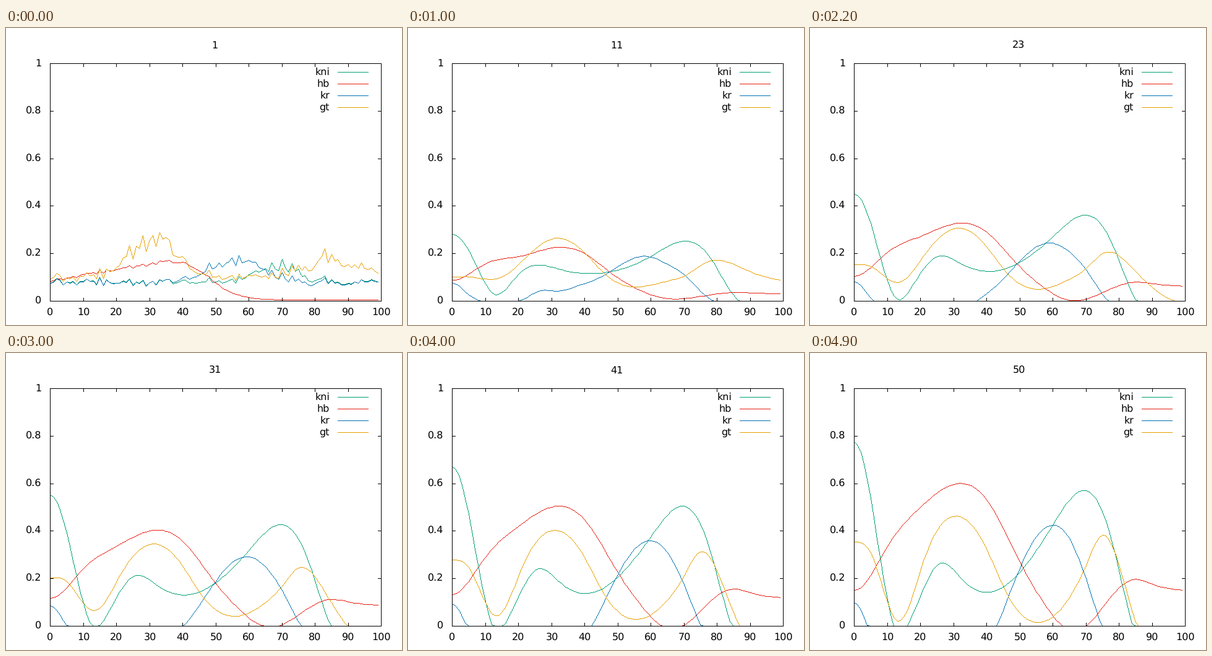
Animation, 640 px wide and 480 px high, one loop 5 s. Source, as a matplotlib script:

```python
import matplotlib.pyplot as plt
import numpy as np
from matplotlib.animation import FuncAnimation
from matplotlib.colors import to_rgb

W, H, DPI = 640, 480, 100
FRAMES, INTERVAL = 50, 100
LEFT, RIGHT, TOP, BOTTOM = 71, 606, 57, 441
RELAX_END = 7
CELLS = np.arange(100)

plt.rcParams["text.hinting"] = "none"
FONT = dict(family="DejaVu Sans", size=16 * 72 / DPI, color="black")


def bump(center, width):
    return np.exp(-((CELLS - center) / width) ** 2 / 2)


# name: colour, growth exponent, noisy start, key points (cell, early, late).
# Levels below zero are clipped when drawn.
GENES = {
    "kni": ("#009e73", 0.85, 0.082 + 0.065 * bump(69, 6), [
        (0, 0.205, 0.775), (5, 0.165, 0.54), (13, 0.036, -0.03), (16, 0.055, 0),
        (20, 0.11, 0.125), (26, 0.135, 0.265), (32, 0.125, 0.205), (41, 0.112, 0.143),
        (60, 0.152, 0.425), (71, 0.204, 0.565), (77, 0.17, 0.4), (84, 0.05, 0.01),
        (99, -0.05, -0.2)]),
    "hb": ("#e51e10", 1.16, (0.08 + 0.0025 * CELLS) / (1 + np.exp((CELLS - 47.5) / 4)) + 0.005, [
        (0, 0.083, 0.15), (10, 0.145, 0.335), (20, 0.166, 0.5), (33, 0.202, 0.6),
        (40, 0.178, 0.532), (50, 0.086, 0.271), (57, 0.04, 0.103), (63, 0.016, 0),
        (69, 0.011, -0.01), (76, 0.017, 0.096), (84, 0.025, 0.195), (91, 0.025, 0.172),
        (99, 0.022, 0.152)]),
    "kr": ("#0072b2", 1.3, 0.08 + 0.09 * bump(56, 8), [
        (0, 0.075, 0.1), (5, 0.03, -0.03), (14, -0.002, -0.12), (20, 0.008, -0.2),
        (27, 0.06, -0.28), (32, 0.057, -0.27), (38, 0.075, -0.16), (45, 0.104, 0.064),
        (52, 0.155, 0.305), (59, 0.177, 0.423), (65, 0.145, 0.37), (70, 0.107, 0.2),
        (75, 0.045, -0.01), (99, -0.05, -0.2)]),
    "gt": ("#e69f00", 1.45, 0.1 + 0.17 * bump(31, 7) + 0.08 * bump(85, 8), [
        (0, 0.092, 0.353), (5, 0.096, 0.31), (13, 0.096, 0.022), (17, 0.119, 0.1),
        (21, 0.162, 0.275), (30, 0.255, 0.462), (40, 0.2, 0.325), (46, 0.115, 0.14),
        (54, 0.062, 0.018), (65, 0.083, 0.12), (70, 0.1, 0.255), (75, 0.142, 0.383),
        (79, 0.168, 0.3), (83, 0.167, 0.113), (92, 0.125, -0.25), (99, 0.105, -0.38)]),
}


def spline(x, y):
    """Natural cubic spline over the cells, level at cell 0 by mirroring."""
    x = np.r_[-x[:0:-1], x] / 100
    y = np.r_[y[:0:-1], y]
    side = np.c_[np.ones_like(x), x]
    cubes = abs(x[:, None] - x) ** 3
    weights = np.linalg.solve(np.block([[cubes, side], [side.T, np.zeros((2, 2))]]),
                              np.r_[y, 0, 0])
    at = CELLS / 100
    return np.c_[abs(at[:, None] - x) ** 3, np.ones_like(at), at] @ weights


def diffuse(y, sigma):
    kernel = np.exp(-((CELLS[:, None] - CELLS) / sigma) ** 2 / 2)
    return kernel @ y / kernel.sum(axis=1)


class Gene:
    def __init__(self, color, power, start, points, noise):
        self.color, self.power = to_rgb(color), power
        x, early, late = np.array(points, float).T
        self.early, self.late = spline(x, early), spline(x, late)
        self.rough = start * (1 + noise)

    def levels(self, step):
        if step >= RELAX_END:
            grown = ((step - RELAX_END) / (FRAMES - RELAX_END)) ** self.power
            y = self.early + grown * (self.late - self.early)
        else:
            mix = (step - 1) / (RELAX_END - 1)
            rough = diffuse(self.rough, 1.4 * np.sqrt(step - 1)) if step > 1 else self.rough
            y = rough + mix * (self.early - rough)
        return np.clip(y, 0, 1)


def to_px(value):
    return np.floor(LEFT + value / 100 * (RIGHT - LEFT) + 0.5).astype(int)


def to_py(value):
    return BOTTOM - np.floor(value * (BOTTOM - TOP) + 0.5).astype(int)


def stroke(canvas, xs, ys, color=(0, 0, 0)):
    """One pixel wide line without smoothing through whole-pixel points."""
    for x0, y0, x1, y1 in zip(xs, ys, xs[1:], ys[1:]):
        n = max(abs(x1 - x0), abs(y1 - y0)) + 1
        rows = np.rint(np.linspace(y0, y1, n)).astype(int)
        cols = np.rint(np.linspace(x0, x1, n)).astype(int)
        canvas[rows, cols] = color


noise = np.random.default_rng(4).normal(0, 0.1, len(CELLS))
genes = {name: Gene(*spec, noise * (0.3 if name == "hb" else 1))
         for name, spec in GENES.items()}
x_ticks = range(0, 101, 10)
y_ticks = (0, 0.2, 0.4, 0.6, 0.8, 1)


def legend_row(index):
    return 71 + 19 * index


def render(step):
    canvas = np.ones((H, W, 3))
    for row, gene in enumerate(genes.values()):
        y = legend_row(row)
        stroke(canvas, [536, 585], [y, y], gene.color)
        stroke(canvas, to_px(CELLS), to_py(gene.levels(step)), gene.color)
    stroke(canvas, [LEFT, RIGHT, RIGHT, LEFT, LEFT], [TOP, TOP, BOTTOM, BOTTOM, TOP])
    for x in map(to_px, x_ticks):
        stroke(canvas, [x, x], [BOTTOM, BOTTOM - 5])
        stroke(canvas, [x, x], [TOP, TOP + 5])
    for y in map(to_py, y_ticks):
        stroke(canvas, [LEFT, LEFT + 5], [y, y])
        stroke(canvas, [RIGHT, RIGHT - 5], [y, y])
    return canvas


fig = plt.figure(figsize=(W / DPI, H / DPI), dpi=DPI, facecolor="white")
ax = fig.add_axes([0, 0, 1, 1])
ax.axis("off")
picture = ax.imshow(render(1), extent=(0, W, H, 0), interpolation="nearest", aspect="auto")


def label(x, baseline, text, align):
    return ax.text(x, baseline, text, ha=align, va="baseline", **FONT)


for value in x_ticks:
    label(to_px(value) + 0.5, 465, str(value), "center")
for value in y_ticks:
    label(57, to_py(value) + 5, f"{value:g}", "right")
for row, name in enumerate(genes):
    label(523, legend_row(row) + 5, name, "right")
title = label(337.5, 33, "1", "center")


def update(frame):
    title.set_text(str(frame + 1))
    picture.set_data(render(frame + 1))
    return picture, title


anim = FuncAnimation(fig, update, frames=FRAMES, interval=INTERVAL, repeat=True, repeat_delay=0)
plt.show()
```
